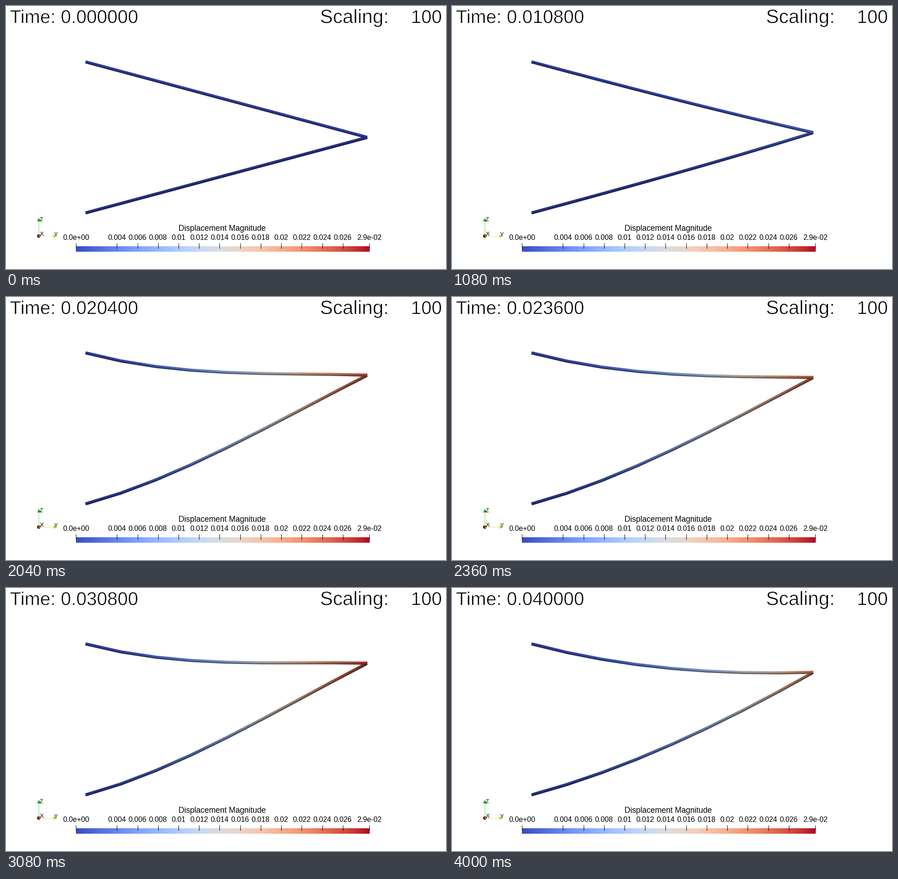
Recreate the animation shown at these times as a matplotlib script. Size 969 by 578 pixels, loop 4040 ms.

```python
import numpy as np
import matplotlib.pyplot as plt
from matplotlib.animation import FuncAnimation
from matplotlib.patches import Circle, Polygon
from matplotlib.patheffects import Stroke

W, H, DPI = 969, 578, 64
FRAMES, STEP = 101, 40
U_MAX, V_MAX = 132, 0.0286        # top of the colour scale in px and in model units
X0, X1 = 175, 796
Y_UP, Y_LOW, RISE = 122.7, 454.7, 166
HALF = 3.4                        # half thickness of a beam

# time (ms), tip travel (px), second bending component (px)
KEYS = np.array([
    (0, 0, 0), (8.6, 0, 0), (9.7, 0.8, -1), (10.8, 10.5, -10), (13.6, 55, 8),
    (16.8, 100, 38), (18.6, 111.5, 36), (20.4, 117, 29), (23.6, 112, 10),
    (26.8, 108.5, 0), (28.8, 117, 18), (30.8, 123.5, 33), (33.5, 122, 16),
    (36.8, 112, -14), (40, 103.5, -28)])
cmap = plt.get_cmap("coolwarm")


def hermite(t, tk, yk):
    slope = np.gradient(yk, tk)
    slope[:2] = 0
    i = int(np.clip(np.searchsorted(tk, t) - 1, 0, len(tk) - 2))
    h = tk[i + 1] - tk[i]
    p = (t - tk[i]) / h
    return ((1 + 2 * p) * (1 - p) ** 2 * yk[i] + p * p * (3 - 2 * p) * yk[i + 1]
            + h * p * (1 - p) * ((1 - p) * slope[i] - p * slope[i + 1]))


fig = plt.figure(figsize=(W / DPI, H / DPI), dpi=DPI, facecolor="white")
ax = fig.add_axes([0, 0, 1, 1])
ax.set_axis_off()


def label(x, y, s, px, ha="left"):
    return ax.text(x, y, s, fontsize=px * 72 / DPI, family="Liberation Sans",
                   ha=ha, va="baseline", color="black")


def heading(x, s, px, ha="left"):
    text = label(x, 37.5, s, px, ha)
    # a white outline gives the light weight of the large type
    text.set_path_effects([Stroke(linewidth=0.9, foreground="white")])
    return text


def line(x, y, color, width):
    ax.plot(x, y, color=color, lw=width * 72 / DPI, solid_capstyle="butt")


# Beams are shaded per pixel inside this window
LEFT, RIGHT, TOP, BOTTOM = 168, 802, 108, 464
px = np.arange(LEFT, RIGHT) + 0.5
py = (np.arange(TOP, BOTTOM) + 0.5)[:, None]
nodes = np.linspace(0, 1, 9)
node_x = X0 + (X1 - X0) * nodes


def lift(t):
    u, c = (hermite(t, KEYS[:, 0], KEYS[:, k]) for k in (1, 2))
    s = nodes
    return u * (3 * s**2 - s**3) / 2 + c * s**2 * (1 - s)


def paint_beam(img, y_nodes, disp):
    yc = np.interp(px, node_x, y_nodes)
    seg = np.clip(np.searchsorted(node_x, px) - 1, 0, 7)
    m = (np.diff(y_nodes) / np.diff(node_x))[seg]
    yc = np.where(px < X0, y_nodes[0] + (px - X0) * m, yc)
    yc = np.where(px > X1, y_nodes[-1] + (px - X1) * m, yc)
    norm = np.sqrt(1 + m * m)
    d = (py - yc) / norm
    along = (px - X0 + (py - yc) * m) / norm
    cover = np.clip(HALF + 0.5 - np.abs(d), 0, 1)
    cover = cover * np.clip(along + 0.5, 0, 1) * np.clip(X1 - px + 0.5, 0, 1)
    shade = np.interp(d / HALF, [-1, -0.2, 0.25, 1], [0.8, 0.72, 0.56, 0.36])
    shade = shade * (1 + 0.3 * m)
    base = cmap(np.interp(px, node_x, np.abs(disp)) / U_MAX)[:, :3]
    color = np.clip(base[None] * shade[..., None], 0, 1)
    img += (color - img) * cover[..., None]


def render(t):
    img = np.ones((BOTTOM - TOP, RIGHT - LEFT, 3))
    d = lift(t)
    paint_beam(img, Y_LOW - RISE * nodes - d, d)
    paint_beam(img, Y_UP + RISE * nodes - d, d)
    return img


beams = ax.imshow(render(0), extent=(LEFT, RIGHT, BOTTOM, TOP),
                  interpolation="nearest", aspect="auto")

# Headings
clock = heading(8.5, "", 40.9)
heading(691.5, "Scaling:", 42.6)
heading(960, "100", 40.9, "right")

# Colour bar
BAR0, BAR1 = 154, 800.5
ax.imshow(np.linspace(0, 1, 256)[None], cmap=cmap, aspect="auto",
          extent=(BAR0, BAR1, 540, 528), interpolation="nearest")
label(476.5, 494.5, "Displacement Magnitude", 17.5, "center")
ticks = [(0, "0.0e+00"), (V_MAX, "2.9e-02")]
ticks += [(k / 1000, f"{k / 1000:g}") for k in range(4, 27, 2)]
for v, name in ticks:
    x = BAR0 + (BAR1 - BAR0) * v / V_MAX
    line([x, x], [521, 533], "black", 1)
    label(x, 514.5, name, 16, "center")

# Orientation axes
line([72.5, 72.5], [505, 473], "#7bf06f", 1.3)
line([72.5, 105], [505.5, 505.5], "#efe9a0", 1.3)
ax.add_patch(Polygon([(72.5, 465.5), (68.5, 473.5), (76.5, 473.5)], fc="#14a514", lw=0))
ax.add_patch(Polygon([(112.5, 505.5), (104.5, 501.5), (104.5, 509.5)], fc="#d2c814", lw=0))
ax.add_patch(Circle((72.3, 505.5), 3.9, fc="#6b0505", lw=0))
for x, y, name in ((77, 473, "Z"), (78.5, 505, "X"), (109.8, 506, "Y")):
    label(x, y, name, 12, "center")

ax.set_xlim(0, W)
ax.set_ylim(H, 0)


def update(i):
    t = i * 0.4
    beams.set_data(render(t))
    clock.set_text(f"Time: {t / 1000:.6f}")
    return beams, clock


anim = FuncAnimation(fig, update, frames=FRAMES, interval=STEP,
                     repeat=True, repeat_delay=0, blit=False)
plt.show()
```
